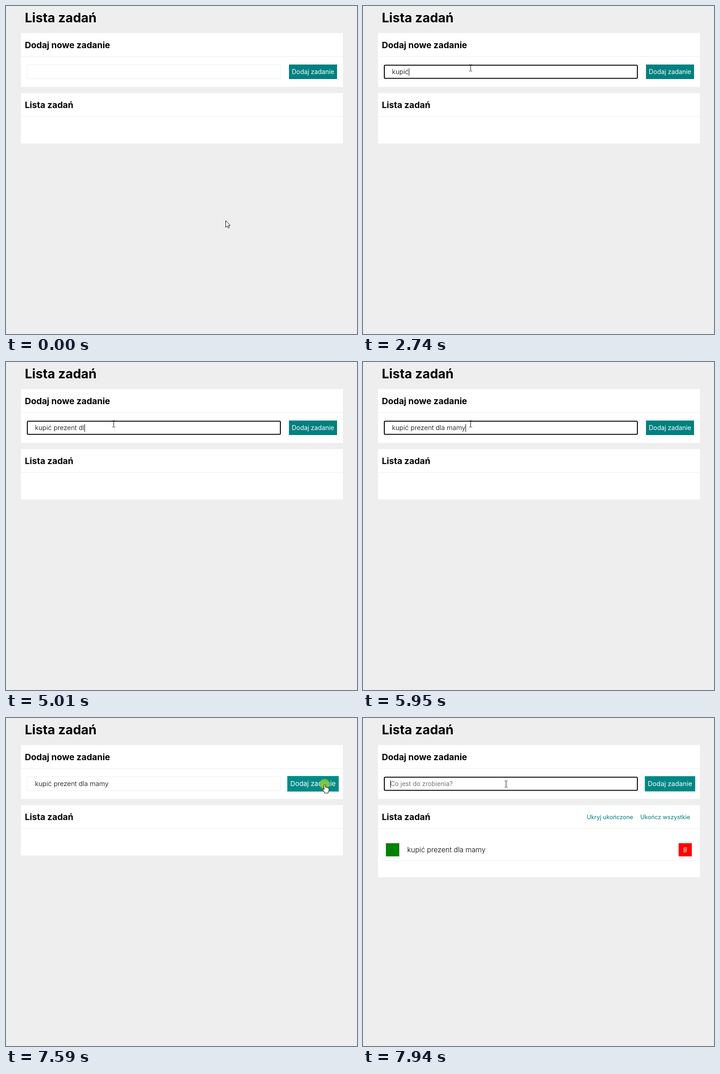
These frames come from a looping animation (774x723 px, 8 s). An HTML page:

```html
<!DOCTYPE html>
<html lang="pl">
<head>
<meta charset="utf-8">
<title>Lista zadań</title>
<style>
  html, body { margin: 0; width: 100%; height: 100%; overflow: hidden; background: #eee; }
  svg { display: block; }
  text { font-family: Inter, "Open Sans", sans-serif; white-space: pre; }
  .bold { font-weight: 700; }
  .heading { font-size: 19.2px; }
  .light { font-weight: 300; }
  .link { font-size: 12.85px; fill: #007878; }
</style>
</head>
<body>
<svg width="774" height="723" viewBox="0 0 774 723">
  <rect width="774" height="723" fill="#eee"/>
  <text class="bold" x="41.5" y="35.5" font-size="28.4">Lista zadań</text>

  <rect x="33" y="59.5" width="710" height="119" fill="#fff"/>
  <text class="bold heading" x="41.5" y="93" >Dodaj nowe zadanie</text>
  <rect x="33" y="111" width="710" height="1" fill="#eee"/>
  <rect id="border" x="46.5" y="129.5" width="559" height="30.5" fill="none" stroke="#eee"/>
  <rect id="outline" x="47" y="130.5" width="558" height="29" rx="2" fill="none" stroke="#000" stroke-width="2"/>
  <text id="placeholder" x="60" y="150" font-size="13.9" fill="#757575">Co jest do zrobienia?</text>
  <text id="typed" class="light" x="64" y="150" font-size="14.65"></text>
  <rect id="caret" y="137" width="1" height="17"/>
  <g id="button">
    <rect id="face" x="624" y="129" width="106" height="32"/>
    <text x="677" y="150" font-size="13.9" fill="#fff" text-anchor="middle">Dodaj zadanie</text>
  </g>

  <rect id="panel" x="33" y="192" width="710" fill="#fff"/>
  <text class="bold heading" x="41.5" y="225">Lista zadań</text>
  <rect x="33" y="243" width="710" height="1" fill="#eee"/>
  <g id="task">
    <text class="link" x="493.5" y="223">Ukryj ukończone</text>
    <text class="link" x="611.5" y="223">Ukończ wszystkie</text>
    <rect x="50.5" y="276" width="29.5" height="29" fill="#008000"/>
    <text class="light" x="97.5" y="295.5" font-size="15.6">kupić prezent dla mamy</text>
    <rect x="696" y="276" width="29" height="29" fill="#f00"/>
    <path d="M706.5 286.5L713.5 285.5V294L711.5 296H707.5V287M709.5 288V294M711.5 288V294"
          fill="none" stroke="#ffe9dc"/>
    <rect x="42" y="314" width="691" height="1" fill="#eee"/>
  </g>

  <g id="pointer">
    <circle id="click" cx=".5" cy=".5" r="11" fill="#86c932" opacity=".85"/>
    <path id="arrow" d="M.5 0V15L4 11.7L6.2 16.5L8.5 15.5L6.4 10.8H10.5Z" fill="#fff" stroke="#000"/>
    <path id="beam" d="M-3 -7H-1L0 -6L1 -7H3M0 -6V6M-3 7H-1L0 6L1 7H3" fill="none" stroke="#000" transform="translate(.5 .5)"/>
    <path id="hand" d="M-.6 2.5Q1 .3 2.6 2.5V8Q5 7 5.8 8.7Q8 8 8.4 9.8Q10 9.3 10.2 11V15L8.5 18V20.5H0V18L-4 12.7Q-3.6 10.3 -1.8 11.6L-.6 13Z"
          fill="#fff" stroke="#000"/>
  </g>
</svg>
<script>
const LOOP = 8000, TICK = 70;
const FOCUS = 880, BLUR = 7590, ADDED = 7660;
const HOVER_IN = 7240, HOVER_OUT = 7790;
const TASK = 'kupić prezent dla mamy';
const KEYS = [1810, 2010, 2210, 2410, 2740, 2870, 3140, 3270, 3470, 3740, 4010,
  4210, 4480, 4610, 4880, 5010, 5140, 5270, 5490, 5620, 5750, 5950];

// Pointer moves: start time, number of ticks, destination, easing
const smooth = p => p * p * (3 - 2 * p);
const linear = p => p;
const easeOut = p => 1 - (1 - p) ** 2;
const MOVES = [
  [60, 6, 238, 133, smooth],
  [610, 1, 237, 136, linear],
  [6480, 3, 280, 103, linear],
  [6820, 4, 743, 123, easeOut],
  [7100, 1, 746, 128, linear],
  [7170, 7, 702, 145, easeOut],
  [7800, 1, 600, 138, linear],
  [7870, 1, 425, 137, linear],
  [7940, 1, 315, 145, linear],
];

const el = Object.fromEntries([...document.querySelectorAll('[id]')].map(e => [e.id, e]));
const measure = document.createElement('canvas').getContext('2d');
const show = (node, on) => node.setAttribute('visibility', on ? 'visible' : 'hidden');
const clamp = v => Math.max(0, Math.min(1, v));
const within = (v, a, b) => v >= a && v < b;

function pointerAt(t) {
  let x = 484, y = 473;
  for (const [start, ticks, toX, toY, ease] of MOVES) {
    if (t < start) break;
    const p = ease(clamp((Math.floor((t - start) / TICK) + 1) / ticks));
    x += (toX - x) * p;
    y += (toY - y) * p;
  }
  return [Math.round(x), Math.round(y)];
}

function drawPointer(t) {
  const [x, y] = pointerAt(t);
  const overField = within(x, 46, 606) && within(y, 129, 161);
  const overButton = within(x, 621, 733) && within(y, 129, 162);
  show(el.beam, overField);
  show(el.hand, overButton);
  show(el.arrow, !overField && !overButton);
  show(el.click, within(t, FOCUS, FOCUS + TICK) || within(t, BLUR, BLUR + TICK));
  el.pointer.setAttribute('transform', `translate(${x} ${y})`);
}

function drawField(t) {
  const added = t >= ADDED;
  const focused = within(t, FOCUS, BLUR) || added;
  const count = added ? 0 : KEYS.filter(k => k <= t).length;
  const text = TASK.slice(0, count);
  el.typed.textContent = text;
  show(el.outline, focused);
  show(el.border, !focused);
  show(el.placeholder, added);

  measure.font = '300 14.65px Inter, "Open Sans", sans-serif';
  const caretX = added ? 60 : count ? 64 + measure.measureText(text).width : 63;
  const lastInput = added ? ADDED : count ? KEYS[count - 1] : FOCUS;
  const caretOn = Math.floor((t - lastInput) / 510) % 2 === 0;
  el.caret.setAttribute('x', Math.round(caretX));
  show(el.caret, focused && caretOn);
}

function drawButton(t) {
  const now = t < HOVER_IN ? t : HOVER_IN + Math.floor((t - HOVER_IN) / TICK) * TICK;
  const hover = smooth(clamp((now - HOVER_IN + TICK) / 350)) * (1 - clamp((now - HOVER_OUT) / 460));
  const scale = 1 + 0.07 * hover;
  el.button.setAttribute('transform',
    `translate(677 145) scale(${scale}) translate(-677 -145)`);
  el.face.setAttribute('fill', `rgb(0 ${128 + 11 * hover} ${128 + 8 * hover})`);
}

function draw(t) {
  drawField(t);
  drawButton(t);
  drawPointer(t);
  show(el.task, t >= ADDED);
  el.panel.setAttribute('height', t >= ADDED ? 159 : 111);
}

const begin = performance.now();
function frame() {
  draw((performance.now() - begin) % LOOP);
  requestAnimationFrame(frame);
}
frame();
</script>
</body>
</html>
```
